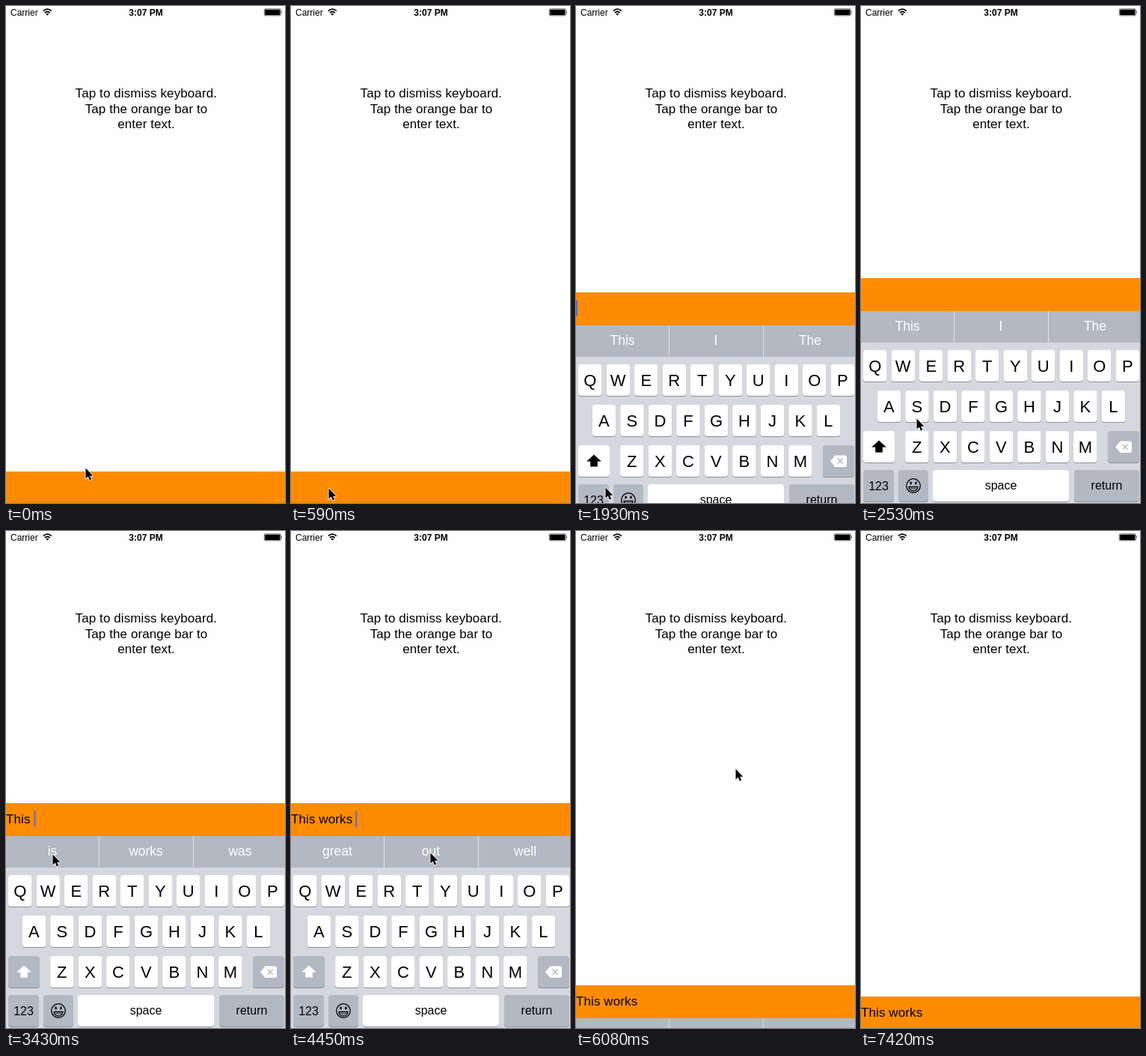
These frames come from a looping animation (373 px wide and 663 px high, 7870 ms). An HTML page:

```html
<!DOCTYPE html>
<html lang="en">
<head>
<meta charset="utf-8">
<title>Keyboard input bar</title>
<style>
  html, body { margin: 0; width: 100%; height: 100%; overflow: hidden; background: #fefefe; }
  svg { display: block; width: 100%; height: 100%; }
  text { font-family: "Liberation Sans", Arial, sans-serif; white-space: pre; }
  .body { font-size: 17px; letter-spacing: .1px; }
  .mid { text-anchor: middle; }
  .hint { font-size: 17.5px; fill: #fff; }
  .letter { font-size: 22px; }
  .label { font-size: 16px; }
</style>
</head>
<body>
<svg id="stage" viewBox="0 0 373 663">
  <rect width="373" height="663" fill="#fefefe"/>

  <g id="status">
    <text x="6" y="12.6" font-size="12">Carrier</text>
    <g fill="none" stroke="#000" stroke-width="1.7">
      <path d="M49.8 6.6Q55.3 1.8 60.8 6.6"/>
      <path d="M51.9 9Q55.3 6 58.7 9"/>
    </g>
    <path d="M53.2 10.6Q55.3 8.9 57.4 10.6L55.3 12.8Z"/>
    <text class="mid" x="187" y="12.6" font-size="12" font-weight="bold">3:07 PM</text>
    <rect x="345.3" y="3.8" width="22" height="9" rx="1.4" fill="none" stroke="#000" stroke-width=".6"/>
    <rect x="346.2" y="4.7" width="20.2" height="7.2" rx=".7"/>
    <path d="M368.2 6.6Q369.7 8.3 368.2 10Z"/>
  </g>

  <g class="body mid">
    <text x="187.3" y="122.4">Tap to dismiss keyboard.</text>
    <text x="187.5" y="142.7">Tap the orange bar to</text>
    <text x="187.5" y="162.9">enter text.</text>
  </g>

  <g id="panel">
    <rect y="363" width="373" height="44" fill="#ff8c00"/>
    <text id="typed" class="body" x="0" y="390"></text>
    <rect id="caret" y="373.5" width="2" height="21.5" rx=".8" fill="#4f6be0"/>
    <rect y="407" width="373" height="256" fill="#d5d8de"/>
    <rect y="407" width="373" height="42" fill="#b2b9c3"/>
    <path d="M124.5 407V449M250.5 407V449" stroke="#dfe2e6"/>
    <g id="hints"></g>
    <g id="keys"></g>
    <path id="shiftIcon" d="M24 579.5L33.8 588.6H28.8V595.5H19.2V588.6H14.2Z" stroke-linejoin="round"/>
    <path d="M346.5 580.5H359.5Q362 580.5 362 583V593.5Q362 596 359.5 596H346.5L340 588.2Z" fill="#fff"/>
    <path d="M349.6 584.6L356.8 591.8M356.8 584.6L349.6 591.8" stroke="#b2b9c3" stroke-width="1.4"/>
    <g fill="none" stroke="#000" stroke-width="1.3">
      <circle cx="70" cy="640" r="9.3"/>
      <path d="M64 641.5H76Q75 647 70 647T64 641.5Z"/>
      <path d="M64.2 644H75.8" stroke-width=".8"/>
    </g>
    <ellipse cx="66.6" cy="636.4" rx="1.3" ry="1.9"/>
    <ellipse cx="73.4" cy="636.4" rx="1.3" ry="1.9"/>
  </g>

  <path id="cursor" d="M.5 .5V14.6L3.7 11.6L5.9 16.6L8.2 15.6L6.1 10.7H10.4Z"
        stroke="#fff" stroke-width="1.6" stroke-linejoin="round" paint-order="stroke"/>
</svg>

<script>
const LOOP = 7870, TICK = 148.2, LAST = 50;
const TRAVEL = 258;              // distance the panel slides
const OPEN = 1692, CLOSE = 5827;
const STIFF = 0.01826;           // spring rate per ms
const GREY = '#b2b9c3';

const $ = id => document.getElementById(id);
const [panel, typed, caret, hints, keys, shiftIcon, cursor] =
  ['panel', 'typed', 'caret', 'hints', 'keys', 'shiftIcon', 'cursor'].map($);

function add(parent, tag, attrs, content = '') {
  const el = document.createElementNS('http://www.w3.org/2000/svg', tag);
  for (const name in attrs) el.setAttribute(name, attrs[name]);
  el.textContent = content;
  return parent.appendChild(el);
}

function key(x, y, w, fill, text = '', cls = 'letter', drop = 29) {
  add(keys, 'rect', { x, y: y + 1, width: w, height: 42, rx: 4, fill: '#8b8f96' });
  const face = add(keys, 'rect', { x, y, width: w, height: 42, rx: 4, fill });
  add(keys, 'text', { x: x + w / 2, y: y + drop, class: cls + ' mid' }, text);
  return face;
}

[['QWERTYUIOP', 3, 459], ['ASDFGHJKL', 21.7, 513], ['ZXCVBNM', 59.1, 567]].forEach(([row, x, y]) =>
  [...row].forEach((ch, i) => key(x + i * 37.5, y, 31.5, '#fff', ch)));
const shiftKey = key(3, 567, 42, '#fff');
key(330, 567, 42, GREY);
key(3, 619, 41, GREY, '123', 'label', 26.5);
key(50, 619, 40, GREY);
key(96, 619, 182, '#fff', 'space', 'label', 25.8);
key(285, 619, 87, GREY, 'return', 'label', 25.8);

const hintTexts = [62, 187, 313].map(x => add(hints, 'text', { x, y: 432.7, class: 'hint mid' }));

// Each step: start time, then its value.
const entries = [[0, '', 0], [3250, 'This ', 37.5], [4290, 'This works ', 86.2]];
const guesses = [[0, 'This I The'], [3250, 'is works was'], [4440, 'great out well']];
const blinks = [[0, 0], [1690, 1], [2220, 0], [2780, 1], [3800, 0], [4290, 1], [4800, 0], [5180, 1], [5630, 0]];
const SHIFT_OFF = 3250;

const route = [
  [0, 106, 616], [148, 112, 624], [296, 84, 636], [445, 50, 643], [593, 39, 642],
  [2075, 39, 642], [2519, 74, 550], [2668, 91, 468], [2816, 74, 445], [2964, 62, 431],
  [3409, 62, 431], [3853, 186, 429], [4446, 186, 429], [5039, 213, 317],
  [6521, 213, 317], [6670, 217, 325], [7262, 344, 640], [7410, 346, 672]
];

const at = (steps, t) => steps.filter(s => s[0] <= t).pop();

function position(t) {
  const i = route.findIndex(p => p[0] > t);
  if (i < 0) return route[route.length - 1].slice(1);
  const a = route[i - 1], b = route[i];
  const k = (t - a[0]) / (b[0] - a[0]);
  return [1, 2].map(j => Math.round(a[j] + (b[j] - a[j]) * k));
}

// Critically damped spring, 0 to 1.
function spring(ms) {
  const x = Math.max(0, ms) * STIFF;
  return 1 - (1 + x) * Math.exp(-x);
}

function draw(t) {
  const shift = TRAVEL * (1 - spring(t - OPEN) + spring(t - CLOSE));
  panel.setAttribute('transform', `translate(0 ${Math.round(shift)})`);

  const [, text, caretX] = at(entries, t);
  typed.textContent = text;
  caret.setAttribute('x', caretX);
  caret.setAttribute('opacity', at(blinks, t)[1]);
  at(guesses, t)[1].split(' ').forEach((word, i) => hintTexts[i].textContent = word);

  const upper = t < SHIFT_OFF;
  shiftKey.setAttribute('fill', upper ? '#fff' : GREY);
  shiftIcon.setAttribute('fill', upper ? '#000' : '#fff');
  cursor.setAttribute('transform', `translate(${position(t).join(' ')})`);
}

function loop() {
  const tick = Math.floor(performance.now() % LOOP / TICK);
  draw(Math.min(tick, LAST) * TICK);
  requestAnimationFrame(loop);
}
loop();
</script>
</body>
</html>
```
